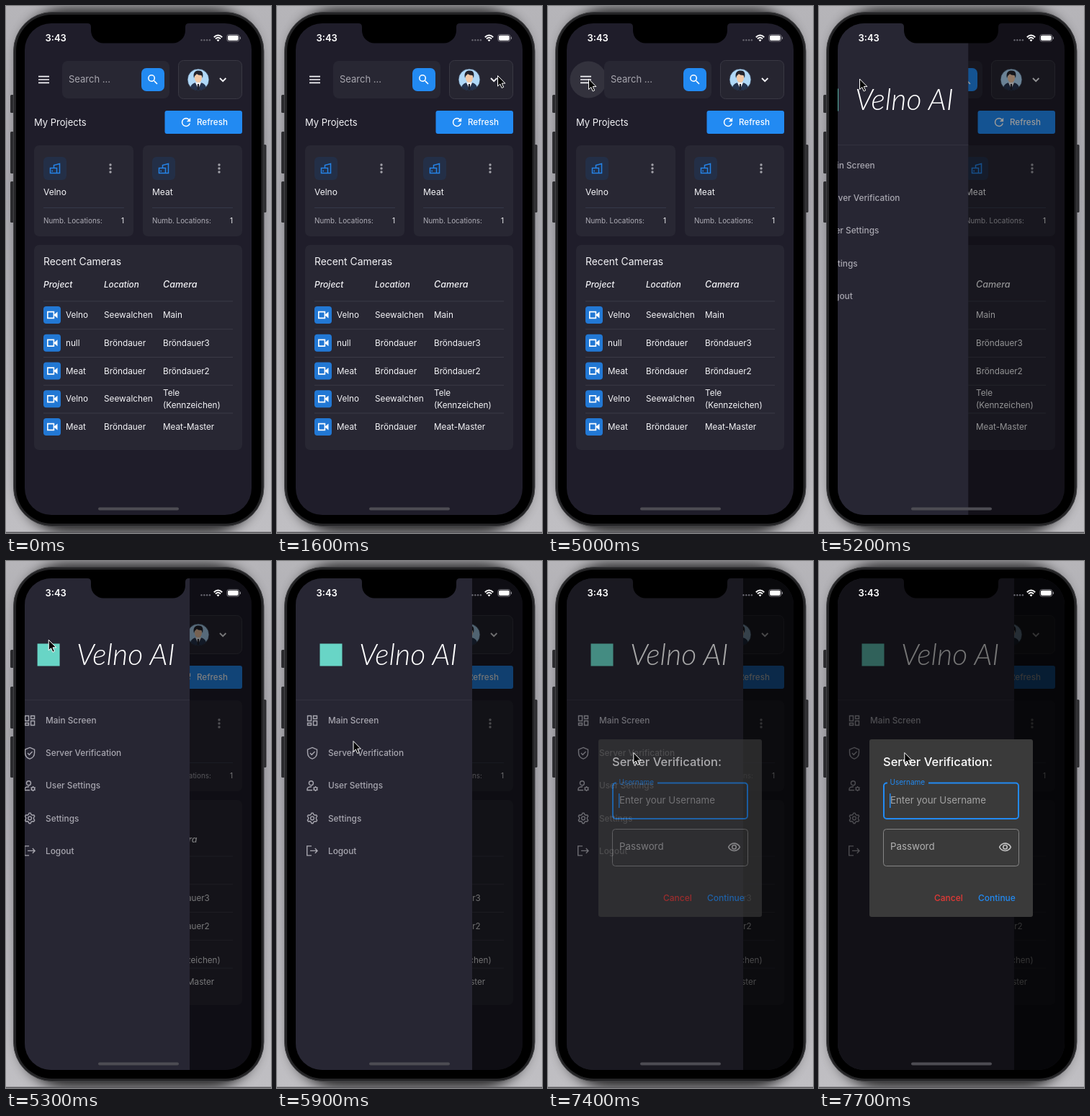
An HTML page that plays this animation: 368x730 px, repeating every 8 s.

```html
<!DOCTYPE html>
<html lang="en">
<head>
<meta charset="utf-8">
<title>Camera app</title>
<style>
html, body { margin: 0; width: 100%; height: 100%; overflow: hidden; background: #9b9a9f; }
svg { display: block; width: 368px; height: 730px; font-family: Inter, "Open Sans", sans-serif; }
</style>
</head>
<body>
<svg id="stage" viewBox="0 0 368 730" xmlns="http://www.w3.org/2000/svg"></svg>
<script>
const WHITE = '#f4f4f7', BLUE = '#228af2', CARD = '#282733';

// Markup helpers
const text = (x, y, str, size, fill = WHITE, extra = '') =>
  `<text x="${x}" y="${y}" font-size="${size}" fill="${fill}" ${extra}>${str}</text>`;
const rect = (x, y, w, h, r, fill, extra = '') =>
  `<rect x="${x}" y="${y}" width="${w}" height="${h}" rx="${r}" fill="${fill}" ${extra}/>`;
const line = (x1, x2, y, color) =>
  `<path d="M${x1} ${y}H${x2}" stroke="${color}" stroke-width="1"/>`;
const stroke = (d, color, w = 1.5, extra = '') =>
  `<path d="${d}" fill="none" stroke="${color}" stroke-width="${w}" ${extra}/>`;
const icon = (cx, cy, size, d, fill) =>
  `<path transform="translate(${cx - size / 2} ${cy - size / 2}) scale(${size / 24})" d="${d}" fill="${fill}"/>`;
const at = (x, y, body) => `<g transform="translate(${x} ${y})">${body}</g>`;

const SEARCH = 'M15.5 14h-.79l-.28-.27A6.47 6.47 0 0 0 16 9.5 6.5 6.5 0 1 0 9.5 16c1.61 0 3.09-.59 4.23-1.57l.27.28v.79l5 4.99L20.49 19zm-6 0a4.5 4.5 0 1 1 0-9 4.5 4.5 0 0 1 0 9z';
const REFRESH = 'M17.65 6.35A7.96 7.96 0 0 0 12 4a8 8 0 1 0 7.73 10h-2.08A6 6 0 1 1 12 6c1.66 0 3.14.69 4.22 1.78L13 11h7V4z';
const EYE = 'M12 6c3.79 0 7.17 2.13 8.82 5.5C19.17 14.87 15.79 17 12 17s-7.17-2.13-8.82-5.5C4.83 8.13 8.21 6 12 6m0-2C7 4 2.73 7.11 1 11.5 2.73 15.89 7 19 12 19s9.27-3.11 11-7.5C21.27 7.11 17 4 12 4zm0 5a2.5 2.5 0 1 1 0 5 2.5 2.5 0 0 1 0-5m0-2a4.5 4.5 0 1 0 0 9 4.5 4.5 0 0 0 0-9z';

function backdrop() {
  const button = (x, y, h) => rect(x, y, 5, h, 1.5, '#2b2b2e');
  return rect(0, 0, 368, 730, 0, 'url(#wall)') +
    rect(19, 3, 330, 727, 66, '#000', 'opacity=".8" filter="url(#soft)"') +
    rect(0, 728.5, 368, 1.5, 0, '#59585c') +
    button(6, 123, 25) + button(6, 174, 58) + button(6, 243, 57) + button(356.5, 192, 94) +
    rect(10.5, 8.5, 347.5, 712, 54, '#242426', 'stroke="#414144"') +
    rect(14, 12, 340.5, 705, 50, '#000');
}

function avatar() {
  return at(267, 102, `<g clip-path="url(#round)">
    <circle r="15.2" fill="#b0d8f7"/>
    <path d="M-11.5 16C-11.5 7 -8 4 0 4S11.5 7 11.5 16z" fill="#26344f"/>
    <path d="M-4 4L0 13L4 4z" fill="#f5f5f8"/>
    <path d="M-1 6H1L1.5 13L0 15L-1.5 13z" fill="#20222d"/>
    <ellipse cy="-2.5" rx="5" ry="6.6" fill="#f1c8a6"/>
    <path d="M-6 -2C-8 -11 -3 -13 1 -12.5C6.5 -12.5 7 -8 6 -2L4.5 -6C1 -6 -1 -7 -2 -8L-5 -5z" fill="#22232c"/>
    </g><circle r="15" fill="none" stroke="#23293a" stroke-width=".8"/>`);
}

function project(x, name) {
  const dots = [-5, 0, 5].map(d => `<circle cx="106" cy="${32 + d}" r="1.7" fill="#a2a1a9"/>`).join('');
  return at(x, 193, rect(0, 0, 138, 126, 7, CARD) +
    rect(13, 16, 32, 32, 6, '#232f47') +
    stroke('M22.5 38.5V31.5H27.5V27.5L35.5 25.5V38.5Z M27.5 31.5H31.5V38.5 M25.2 34.5V36.5', '#2583e6', 1.5) +
    dots + text(13, 69, name, 12) + line(13, 125, 86.5, '#343849') +
    text(13, 108.3, 'Numb. Locations:', 9.9, '#b0afb8') +
    text(125, 108.3, '1', 10, WHITE, 'text-anchor="end"'));
}

function camera(cy, name, place, cam) {
  const lines = [].concat(cam);
  const top = cy + 4 - (lines.length - 1) * 8.3;
  return rect(52, cy - 12, 24, 24, 4, '#2278d4') +
    stroke(`M57.8 ${cy - 4.4}h8.6v8.8h-8.6z`, '#fff', 1.6) +
    `<path d="M67 ${cy - .8}L71.5 ${cy - 4.4}V${cy + 4.4}L67 ${cy + .8}z" fill="#fff"/>` +
    text(83, cy + 4, name, 11.7) + text(136, cy + 4, place, 11.8) +
    lines.map((s, i) => text(218, top + i * 16.6, s, 11.7)).join('');
}

function page() {
  const head = 'font-style="italic" font-weight="500"';
  const rows = [
    ['Velno', 'Seewalchen', 'Main'],
    ['null', 'Bröndauer', 'Bröndauer3'],
    ['Meat', 'Bröndauer', 'Bröndauer2'],
    ['Velno', 'Seewalchen', ['Tele', '(Kennzeichen)']],
    ['Meat', 'Bröndauer', 'Meat-Master']
  ];
  return rect(26, 24, 315, 681, 0, '#1f1d2a') +
    '<circle id="ripple" cx="56" cy="102" fill="#33323d"/>' +
    stroke('M45 97.6H60M45 102H60M45 106.4H60', WHITE, 1.6) +
    rect(78, 76, 149, 52, 8, CARD) + text(87, 106, 'Search ...', 13, '#a8a7af') +
    rect(188, 86, 32, 32, 7, BLUE) + icon(204, 102, 18.5, SEARCH, '#fff') +
    rect(239.5, 75.5, 88, 53, 7, '#262530', 'stroke="#393843"') + avatar() +
    stroke('M297 100L301.2 104.2L305.4 100', WHITE, 1.8) +
    text(39, 165.5, 'My Projects', 13) +
    rect(220.5, 145, 107.5, 32, 3, BLUE) + icon(250, 161, 18.5, REFRESH, '#fff') +
    text(265, 165, 'Refresh', 11.6, '#fff', 'font-weight="500"') +
    project(39, 'Velno') + project(190, 'Meat') +
    rect(39, 331, 289, 284, 7, CARD) + text(52, 359, 'Recent Cameras', 13.9) +
    text(52, 390, 'Project', 12, WHITE, head) + text(136, 390, 'Location', 11.7, WHITE, head) +
    text(218, 390, 'Camera', 12.5, WHITE, head) +
    rows.map((r, i) => line(52, 315, 409 + i * 38.75, '#3b3a46') + camera(428 + i * 38.75, ...r)).join('');
}

function drawer() {
  const grey = '#a8a7b0';
  const gear = Array.from({ length: 24 }, (_, i) => {
    const a = i * Math.PI / 12 - .13, r = i % 4 < 2 ? 7.2 : 5.4;
    return `${(Math.sin(a) * r).toFixed(2)} ${(-Math.cos(a) * r).toFixed(2)}`;
  }).join('L');
  const items = [
    ['Main Screen', 'M-6.5 -6.5H-1.5V.5H-6.5ZM1.5 -6.5H6.5V-2.5H1.5ZM1.5 .5H6.5V6.5H1.5ZM-6.5 3.5H-1.5V6.5H-6.5Z'],
    ['Server Verification', 'M0 -7.7L6.5 -5V-.5C6.5 4 3.5 7 0 8C-3.5 7 -6.5 4 -6.5 -.5V-5ZM-3 0L-.8 2.3L3.5 -2.2'],
    ['User Settings', 'M-4.6 -3.5a3 3 0 1 0 6 0a3 3 0 1 0 -6 0M0 6.3H-7V4.5C-7 2.5 -4 1.4 -1 1.5M2.3 4.3a2.2 2.2 0 1 0 4.4 0a2.2 2.2 0 1 0 -4.4 0M4.5 .7V2M4.5 6.6V7.9M1.4 2.5L2.6 3.2M6.4 5.4L7.6 6.1M1.4 6.1L2.6 5.4M6.4 3.2L7.6 2.5'],
    ['Settings', `M${gear}ZM-2.4 0a2.4 2.4 0 1 0 4.8 0a2.4 2.4 0 1 0 -4.8 0`],
    ['Logout', 'M-1 -6.5H-7.3V6.5H-1M-3 0H7M3.8 -3.3L7 0L3.8 3.3']
  ];
  return rect(26, 24, 245, 681, 0, '#272633') +
    rect(59.5, 114.5, 31, 31, 0, '#68d5c6') +
    text(114, 144, 'Velno AI', 41, '#fff', 'font-family="Lato, sans-serif" font-weight="300" font-style="italic"') +
    line(26, 271, 192.5, '#32313e') +
    items.map(([label, d], i) => {
      const y = 221 + i * 45.1;
      return at(49, y, stroke(d, grey, 1.4)) + text(71, y + 4.2, label, 11.8, grey, 'font-weight="500"');
    }).join('');
}

function dialog() {
  return rect(70, 247, 227, 246, 3, '#3a3a3a') +
    text(89, 284, 'Server Verification:', 16.5, '#fff', 'font-weight="500"') +
    rect(90, 307.5, 187, 49.5, 4, 'none', `stroke="${BLUE}" stroke-width="2"`) +
    rect(95, 304, 57, 6, 0, '#3a3a3a') + text(98.5, 310, 'Username', 10, BLUE) +
    text(99, 336, 'Enter your Username', 13.3, '#a3a3a3') +
    rect(98, 322, 1.5, 20, 0, BLUE) +
    rect(89.5, 371.5, 188, 51, 4, 'none', 'stroke="#858585"') +
    text(99, 400, 'Password', 13.3, '#b2b2b2') + icon(258.5, 396.7, 19, EYE, '#c2c2c2') +
    text(160, 471, 'Cancel', 12, '#e53935', 'font-weight="500"') +
    text(221, 471, 'Continue', 12, BLUE, 'font-weight="500"');
}

function chrome() {
  const dots = [0, 1, 2, 3].map(i => `<circle cx="${271.5 + i * 3.8}" cy="47.2" r="1.2" fill="#65646d"/>`).join('');
  return text(54.5, 48.8, '3:43', 13, '#fff', 'font-weight="600"') + dots +
    stroke('M288.8 43.2Q294.5 37.8 300.2 43.2M291 45.5Q294.5 42.2 298 45.5', '#fff', 1.9) +
    '<path d="M292.6 47.2Q294.5 45.5 296.4 47.2L294.5 49.2z" fill="#fff"/>' +
    rect(306.8, 39.5, 17, 9.5, 2.8, 'none', 'stroke="#8b8a91" stroke-width=".8"') +
    rect(308, 40.7, 14.6, 7.1, 1.8, '#fff') + rect(324.8, 42.6, 1.2, 3.4, .6, '#8b8a91') +
    '<path d="M113 23V24Q118 24 118 29V34A17.5 17.5 0 0 0 135.5 51.5H231.5A17.5 17.5 0 0 0 249 34V29Q249 24 254 24V23z" fill="#000"/>' +
    rect(128, 694.5, 112, 4, 2, '#4d4c53');
}

const stage = document.getElementById('stage');
stage.innerHTML = `<defs>
  <linearGradient id="wall" x2="0" y2="1">
    <stop offset="0" stop-color="#b6b5b9"/><stop offset=".35" stop-color="#a9a8ae"/><stop offset="1" stop-color="#c0bfc3"/>
  </linearGradient>
  <filter id="soft" x="-20%" y="-20%" width="140%" height="140%"><feGaussianBlur stdDeviation="9"/></filter>
  <clipPath id="screen"><rect x="26" y="24" width="315" height="681" rx="37"/></clipPath>
  <clipPath id="round"><circle r="15.2"/></clipPath>
  </defs>${backdrop()}
  <g clip-path="url(#screen)">${page()}
    ${rect(26, 24, 315, 681, 0, '#000', 'id="shade"')}
    <g id="drawer">${drawer()}</g>
    ${rect(26, 24, 315, 681, 0, '#000', 'id="veil"')}
    <g id="dialog">${dialog()}</g>
  </g>${chrome()}
  <path id="cursor" d="M0 0V14.6L3.3 11.5L5.7 17L8.2 15.9L5.8 10.6H10.4Z" fill="#050505" stroke="#fff" stroke-width="1" stroke-linejoin="round"/>`;

const [ripple, shade, panel, veil, modal, cursor] =
  ['ripple', 'shade', 'drawer', 'veil', 'dialog', 'cursor'].map(id => document.getElementById(id));

// Pointer stops: time, x, y
const stops = [
  [100, 234, 352], [200, 237, 349], [300, 237, 349], [1200, 319, 93], [1600, 306.5, 96.5],
  [4200, 306.5, 96.5], [4900, 56.5, 101], [5200, 56.5, 101], [5900, 106, 249.5],
  [6300, 109, 277], [7000, 118.8, 265.5]
];
const clamp = v => Math.min(1, Math.max(0, v));
const ease = v => v * v * (3 - 2 * v);

function pointer(t) {
  let i = 0;
  while (i < stops.length - 2 && t >= stops[i + 1][0]) i++;
  const [t0, x0, y0] = stops[i], [t1, x1, y1] = stops[i + 1];
  const k = ease(clamp((t - t0) / (t1 - t0)));
  return [x0 + (x1 - x0) * k, y0 + (y1 - y0) * k];
}

function draw(t) {
  const [x, y] = pointer(t);
  cursor.setAttribute('transform', `translate(${x} ${y})`);
  cursor.setAttribute('visibility', t < 100 ? 'hidden' : 'visible');

  const press = t < 5200 ? clamp((t - 4700) / 300) : 0;
  ripple.setAttribute('r', press ? 12 + 13.5 * press : 0);
  ripple.setAttribute('opacity', press);

  const open = t < 5200 ? 0 : 1 - .26 * (1 - clamp((t - 5200) / 200)) ** 2;
  panel.setAttribute('transform', `translate(${-245 * (1 - open)} 0)`);
  panel.setAttribute('visibility', open ? 'visible' : 'hidden');
  shade.setAttribute('opacity', .54 * open);

  const show = t < 7400 ? 0 : 1 - (1 - clamp((t - 7300) / 250)) ** 2;
  veil.setAttribute('opacity', .54 * show);
  modal.setAttribute('opacity', show);
}

const start = performance.now();
function tick() {
  const t = (performance.now() - start) % 8000;
  draw(Math.floor(t / 100) * 100);
  requestAnimationFrame(tick);
}
draw(0);
requestAnimationFrame(tick);
</script>
</body>
</html>
```
